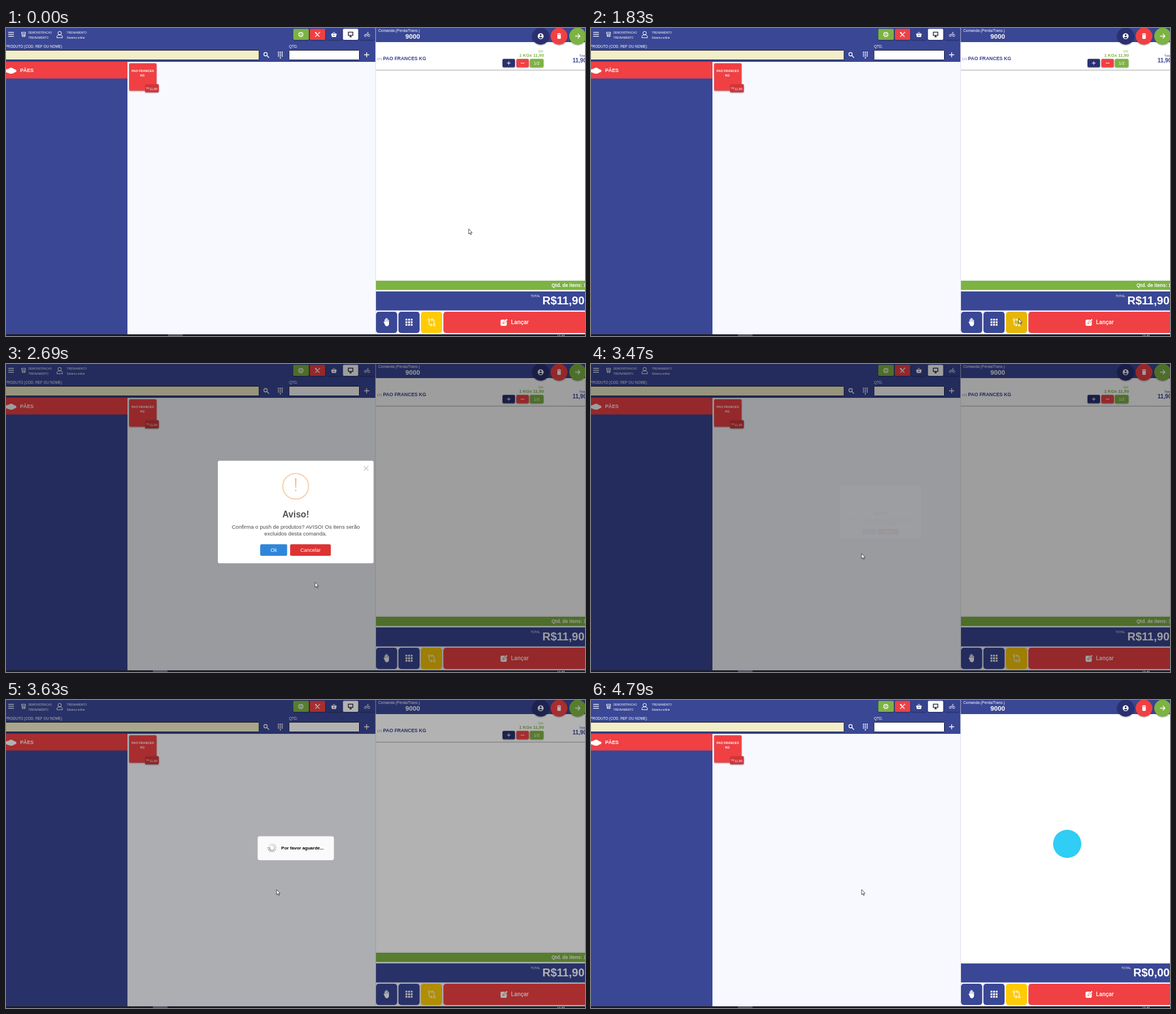
These frames come from a looping animation (1025x546 px, 5.65 s). An HTML page:

```html
<!DOCTYPE html>
<html lang="pt">
<head>
<meta charset="utf-8">
<title>PDV</title>
<style>
  html, body { margin: 0; width: 100%; height: 100%; overflow: hidden; background: #fff; }
  svg { display: block; width: 1025px; height: 546px; font-family: "Liberation Sans", Arial, sans-serif; }
  .b { font-weight: 700; }
  .mid { text-anchor: middle; }
  .end { text-anchor: end; }
  .blue { fill: #3a4795; }
  .navy { fill: #2a3070; }
  .red { fill: #f04043; }
  .green { fill: #7cb342; }
  .white { fill: #fff; }
  .line { fill: none; stroke: #fff; stroke-width: 1.3; }
  .lift { filter: drop-shadow(0 1px 1.2px rgba(0, 0, 0, .4)); }
</style>
</head>
<body>
<svg viewBox="0 0 1025 546">
  <rect width="1025" height="546" fill="#f8f9ff"/>

  <!-- header and sidebar -->
  <rect class="blue" width="654" height="60"/>
  <rect class="blue" y="59" width="215" height="484"/>
  <rect class="red" y="60" width="215" height="29.5"/>
  <g class="white">
    <ellipse cx="4" cy="76" rx="5" ry="3.6"/><ellipse cx="9" cy="73.5" rx="5" ry="3"/>
    <ellipse cx="13" cy="76" rx="5.5" ry="3.2"/><ellipse cx="9" cy="78.5" rx="5" ry="2.5"/>
    <text class="b" x="25" y="77.5" font-size="8.8">PÃES</text>
    <path d="M4 7h10v1.3H4zM4 10.5h10v1.3H4zM4 14h10v1.3H4z"/>
    <g font-size="4.9">
      <text x="39.5" y="10">DEMONSTRACAO</text>
      <text x="39.5" y="19">TREINAMENTO</text>
      <text x="107.5" y="10">TREINAMENTO</text>
      <text x="107.5" y="19">Sistema online</text>
    </g>
    <text x="-1.5" y="34.5" font-size="6.4">PRODUTO (COD. REF OU NOME)</text>
    <text x="501" y="34.5" font-size="6.5">QTD.</text>
  </g>
  <g class="line" stroke-width="1">
    <path d="M27.5 7.5h7v2.5h-7zM28.5 10v5h5.5v-5M30 15v-3h2.5v3" style="stroke-width:.9"/>
    <circle cx="95" cy="9" r="3" style="stroke-width:1"/>
    <path d="M90 17.2q0-4.7 3.2-4.9h3.6q3.2.2 3.2 4.9z" style="stroke-width:1"/>
    <circle cx="459.5" cy="46.5" r="3"/><path d="M461.7 48.7l4 4"/>
    <path d="M634 47.5h9M638.5 43v9"/>
  </g>
  <path id="pad" class="white"/>
  <rect x="-3" y="39.5" width="451" height="17" rx="1" fill="#f3eec9" stroke="#15172b"/>
  <rect x="501" y="39.5" width="124.5" height="17" rx="1" fill="#fff" stroke="#15172b"/>

  <!-- mode buttons -->
  <g class="lift">
    <rect class="green" x="508.5" y="1.5" width="27.5" height="19.5" rx="2"/>
    <rect class="red" x="538" y="1.5" width="27" height="19.5" rx="2"/>
    <rect x="567" y="1.5" width="27" height="19.5" rx="2" fill="#364391"/>
    <rect class="white" x="596.5" y="1.5" width="27" height="19.5" rx="2"/>
    <rect x="626" y="1.5" width="27" height="19.5" rx="2" fill="#364391"/>
  </g>
  <circle class="white" cx="522" cy="11.5" r="4.5"/>
  <g fill="none" stroke="#7cb342" stroke-width=".7">
    <circle cx="522" cy="11.5" r="2.6"/><path d="M518 11.5h8M522 7.5v8M519.2 8.7l5.6 5.6M524.8 8.7l-5.6 5.6"/>
  </g>
  <g class="line">
    <path d="M547.5 15.5l6-6M547.5 8l7.5 7.5M553 10l3-3"/>
    <path d="M547.5 7.5l2.5 2.5" style="stroke-width:2.4"/>
    <path d="M577.5 10.5l3-3.5 3 3.5" style="stroke-width:1"/>
    <path d="M606 7.3h8v5.8h-8z" style="stroke:#15172b"/>
    <path d="M608 15.5h4M610 13v2.5" style="stroke:#15172b"/>
    <g style="stroke-width:.8">
      <circle cx="636.2" cy="13.4" r="1.9"/><circle cx="642.2" cy="13.4" r="1.9"/>
      <path d="M636.2 13.4l2.3-3 2 1.6v2.4M638.5 10.4l1.7-1 1.2 1.5h1.5"/>
    </g>
  </g>
  <circle class="white" cx="640.7" cy="7.8" r=".9"/>
  <path class="white" d="M575.5 10h10l-1.4 6h-7.2z"/>
  <circle cx="580.5" cy="13" r="1" fill="#364391"/>

  <!-- product card -->
  <g class="lift">
    <rect class="red" x="218" y="62.5" width="48.5" height="48.5" rx="2"/>
    <rect x="246" y="99.5" width="24.5" height="14.5" rx="2" fill="#d0363a"/>
  </g>
  <g class="white">
    <text class="b mid" x="242" y="78" font-size="5.5">PAO FRANCES</text>
    <text class="b mid" x="241.5" y="85.7" font-size="5.5">KG</text>
    <text x="248.3" y="107.5" font-size="3.7">R$</text>
    <text x="254" y="109.8" font-size="5.7">11,90</text>
  </g>

  <!-- order panel -->
  <rect class="white" x="654" width="371" height="467"/>
  <rect class="blue" x="654" width="371" height="25"/>
  <path d="M654.3 0v543" stroke="#d5d7e2" stroke-width=".8"/>
  <text class="white" x="659" y="7" font-size="6.7">Comanda (Perda/Trans.)</text>
  <text class="white b mid" x="720" y="19" font-size="11.6">9000</text>
  <g class="lift">
    <circle class="navy" cx="946.5" cy="14.5" r="15"/>
    <circle class="red" cx="979" cy="14.5" r="15"/>
    <circle class="green" cx="1012" cy="14.5" r="15"/>
  </g>
  <circle class="white" cx="946.5" cy="14.5" r="5.2"/>
  <circle class="navy" cx="946.5" cy="12.8" r="1.7"/>
  <path class="navy" d="M943.2 17q3.3-2.6 6.6 0q-3.3 3-6.6 0z"/>
  <path class="white" d="M975.3 10h2l.8-1h2l.8 1h2v1.3h-7.6zM976 12h6.2v6.2q0 1-1 1h-4.2q-1 0-1-1z"/>
  <path class="line" d="M1007.5 14.5h8.5M1012.2 10.5l4 4-4 4"/>

  <g id="item">
    <path d="M655 74.6h370" stroke="#b4b4b4" stroke-width="1.2"/>
    <text x="656.8" y="57" font-size="5.4" fill="#6a70a0">171</text>
    <g fill="#36428f">
      <text class="b" x="667.5" y="57" font-size="8.5">PAO FRANCES KG</text>
      <text x="1015" y="50.7" font-size="5.5">Total</text>
      <text class="b" x="1003" y="61.3" font-size="10">11,90</text>
    </g>
    <g class="green">
      <text class="end" x="952" y="42.5" font-size="5.2">Qtd.</text>
      <text class="b end" x="952.3" y="50.8" font-size="7.8">1 KGx 11,90</text>
    </g>
    <g class="lift">
      <rect class="navy" x="879" y="54.8" width="22" height="14.7" rx="2"/>
      <rect class="red" x="903.5" y="54.8" width="22" height="14.7" rx="2"/>
      <rect class="green" x="927.5" y="54.8" width="24" height="14.7" rx="2"/>
    </g>
    <path class="line" style="stroke-width:1" d="M886.8 62.2h6.4M890 59v6.4M911.3 62.2h6.4"/>
    <text class="white mid" x="939.5" y="64.8" font-size="7.5">1/2</text>
    <rect x="655" y="446" width="370" height="21" fill="#f6f7fc"/>
    <rect class="green" x="655" y="448" width="370" height="16.3"/>
    <text class="white b" x="965.7" y="459.2" font-size="8.5">Qtd. de itens: 1</text>
  </g>
  <circle id="mark" cx="843" cy="255" r="25" fill="#30cdf4"/>

  <rect class="blue" x="655" y="467" width="370" height="33.7"/>
  <g class="white">
    <text id="label" y="477.3" font-size="5.4">TOTAL</text>
    <text id="sum" class="b" y="490.3" font-size="20"></text>
  </g>
  <rect class="blue" x="655" y="503" width="37.5" height="37.8" rx="5"/>
  <rect class="blue" x="694.7" y="503" width="37.5" height="37.8" rx="5"/>
  <rect id="push" x="734.5" y="503" width="37.5" height="37.8" rx="5" fill="#ffcb05"/>
  <rect class="red" x="774.3" y="503" width="262" height="37.8" rx="5"/>
  <path d="M671 522v-5M673 521v-6.3M675 521v-5.5M677.2 522v-4M669.2 521.5l2.3 3" stroke="#fff" stroke-width="1.6" stroke-linecap="round"/>
  <path class="white" d="M670.2 521h7.8v3.5q-.5 4.2-4 4.2-2.5 0-3.8-4z"/>
  <path id="grid" class="white"/>
  <g class="line" style="stroke-width:1.1">
    <circle cx="749" cy="517" r="1.7"/><circle cx="758" cy="526.5" r="1.7"/>
    <path d="M749 518.8v5.2q0 2.5 2.5 2.5h2M752 524.3l2.2 2.2-2.2 2.2M758 524.7v-5.2q0-2.5-2.5-2.5h-2M755 514.8l-2.2 2.2 2.2 2.2"/>
  </g>
  <rect class="white" x="875.5" y="517" width="11" height="11" rx="2"/>
  <path d="M879.5 524l.6-2.6 6.2-6.2 2 2-6.2 6.2z" fill="#fff" stroke="#f04043" stroke-width=".9"/>
  <text class="white" x="894" y="525.3" font-size="10.3" font-weight="500" font-family="Roboto, sans-serif">Lançar</text>

  <!-- taskbar -->
  <rect y="543" width="1025" height="3" fill="#1c1e28"/>
  <rect id="tab" y="543" width="26" height="3" fill="#50545e"/>
  <text class="white" x="975.5" y="548" font-size="5.5">12:30</text>

  <rect id="dim" width="1025" height="543"/>

  <g id="modal">
    <rect class="white" x="375" y="171.5" width="275.7" height="181.7" rx="3"/>
    <path d="M633.5 181l8 8M641.5 181l-8 8" stroke="#c4c4c4" stroke-width="1.1"/>
    <circle cx="512.8" cy="216.8" r="22.8" fill="none" stroke="#facea8" stroke-width="2"/>
    <path id="bang" d="M511.6 202.5h2.6l-.5 16.8h-1.6zM511.8 223h2.2v2.6h-2.2z" fill="#f8bb86" stroke="#f8bb86"/>
    <g class="mid" fill="#484848">
      <text class="b" x="513" y="272" font-size="15.7" fill="#545454">Aviso!</text>
      <g font-size="9.58">
        <text x="513" y="291.7">Confirma o push de produtos? AVISO! Os itens serão</text>
        <text x="512.6" y="303.7">excluidos desta comanda.</text>
      </g>
    </g>
    <rect x="450" y="319.5" width="47.7" height="20.5" rx="2.5" fill="#2f86d9"/>
    <rect x="503" y="319.5" width="72" height="20.5" rx="2.5" fill="#dd3333"/>
    <g id="choices" class="white mid" font-size="9">
      <text x="474" y="333">Ok</text>
      <text x="539" y="333">Cancelar</text>
    </g>
  </g>

  <g id="loader">
    <rect x="445.5" y="241.5" width="135" height="42.5" rx="4" fill="#fafafa"/>
    <g id="spin" stroke="#555" stroke-width="1.2" stroke-linecap="round"></g>
    <text class="b" x="487.3" y="265.3" font-size="8">Por favor aguarde...</text>
  </g>

  <path id="cursor" d="M0 0v9.2l2.1-1.9 1.5 3.2 1.3-.6-1.4-3.1h2.8z" fill="#fff" stroke="#22242c" stroke-width=".8"/>
</svg>
<script>
const LOOP = 5650;
const $ = id => document.getElementById(id);

// bursts of screen updates: start, end, count
const bursts = [
  [360, 590, 4], [760, 1290, 8], [1370, 1920, 8], [1990, 2140, 3], [2300, 2860, 8],
  [2930, 3470, 8], [3550, 3780, 4], [3930, 4010, 2], [4560, 4790, 4]
];

// tracks: time, value
const pathX = [[290, 819], [590, 808], [690, 808], [1210, 764], [1290, 762], [1600, 757],
  [2230, 757], [2690, 549], [2860, 516], [3160, 479]];
const pathY = [[290, 356], [590, 355], [690, 355], [1210, 476], [1290, 487], [1600, 515],
  [2230, 515], [2690, 388], [2860, 367], [3160, 336]];
const modalScale = [[1853, .7], [1983, 1.05], [2083, .95], [2140, 1], [3355, 1], [3505, .5]];
const modalFade = [[1852, 0], [1853, 1], [3355, 1], [3505, 0]];
const dimFade = [[1853, 0], [1953, .38], [3470, .38], [3630, .3], [3880, .3], [4005, 0]];
const loaderScale = [[3490, 1.1], [3620, 1], [3880, 1], [4005, .9]];
const loaderFade = [[3490, 0], [3620, 1], [3880, 1], [4005, 0]];
const itemFade = [[4520, 1], [4700, 0]];
const markFade = [[4560, 0], [4780, 1]];
const pushShade = [[1600, 1], [1760, .9], [2230, .9], [2380, 1]];

const linear = p => p;
const ease = p => 1 - (1 - p) ** 2.3;

function track(t, keys, curve = ease) {
  if (t <= keys[0][0]) return keys[0][1];
  for (let i = 1; i < keys.length; i++) {
    const [a, from] = keys[i - 1], [b, to] = keys[i];
    if (t < b) return from + (to - from) * curve((t - a) / (b - a));
  }
  return keys[keys.length - 1][1];
}

function snap(t) {
  let s = 0;
  for (const [a, b, n] of bursts) {
    if (t < a) break;
    const gap = (b - a) / (n - 1);
    s = a + gap * Math.min(n - 1, Math.floor((t - a + 14) / gap));
  }
  return s;
}

function dots(cx, cy, gap, size, rows) {
  let d = "";
  for (let i = 0; i < rows * 3; i++) {
    const x = cx + (i % 3 - 1) * gap - size / 2, y = cy + Math.floor(i / 3) * gap - size / 2;
    d += `M${x} ${y}h${size}v${size}h${-size}z`;
  }
  return d;
}

function zoom(el, scale, alpha) {
  el.setAttribute("transform", `translate(513 262.5) scale(${scale}) translate(-513 -262.5)`);
  el.setAttribute("opacity", alpha);
}

$("grid").setAttribute("d", dots(713.5, 517, 4.6, 3.2, 3));
$("pad").setAttribute("d", dots(485.7, 43, 3.3, 2, 3) + "M484.7 51.9h2v2h-2z");
for (let i = 0; i < 12; i++)
  $("spin").innerHTML += `<path d="M0-4v-3.6" transform="rotate(${i * 30})" opacity="${.15 + i * .07}"/>`;

function draw(t) {
  const s = snap(t), size = track(s, modalScale), moving = size !== 1, empty = s >= 4630;
  $("cursor").setAttribute("transform", `translate(${track(s, pathX, linear)} ${track(s, pathY, linear)})`);
  $("dim").setAttribute("opacity", track(s, dimFade));
  zoom($("modal"), size, track(s, modalFade));
  $("choices").setAttribute("font-weight", moving ? 700 : 400);
  $("bang").setAttribute("stroke-width", moving ? .7 : 0);
  zoom($("loader"), track(s, loaderScale), track(s, loaderFade));
  $("spin").setAttribute("transform", `translate(471 262) rotate(${Math.floor(s * .012) * 30 + 90})`);
  $("item").setAttribute("opacity", track(s, itemFade));
  $("mark").setAttribute("opacity", track(s, markFade));
  $("push").style.filter = `brightness(${track(s, pushShade)})`;
  $("tab").setAttribute("x", s < 1840 ? 287 : 260);
  $("label").setAttribute("x", empty ? 939 : 928.7);
  $("sum").setAttribute("x", empty ? 960 : 949.5);
  $("sum").textContent = empty ? "R$0,00" : "R$11,90";
}

const start = performance.now();
function tick() {
  draw((performance.now() - start) % LOOP);
  requestAnimationFrame(tick);
}
tick();
</script>
</body>
</html>
```
